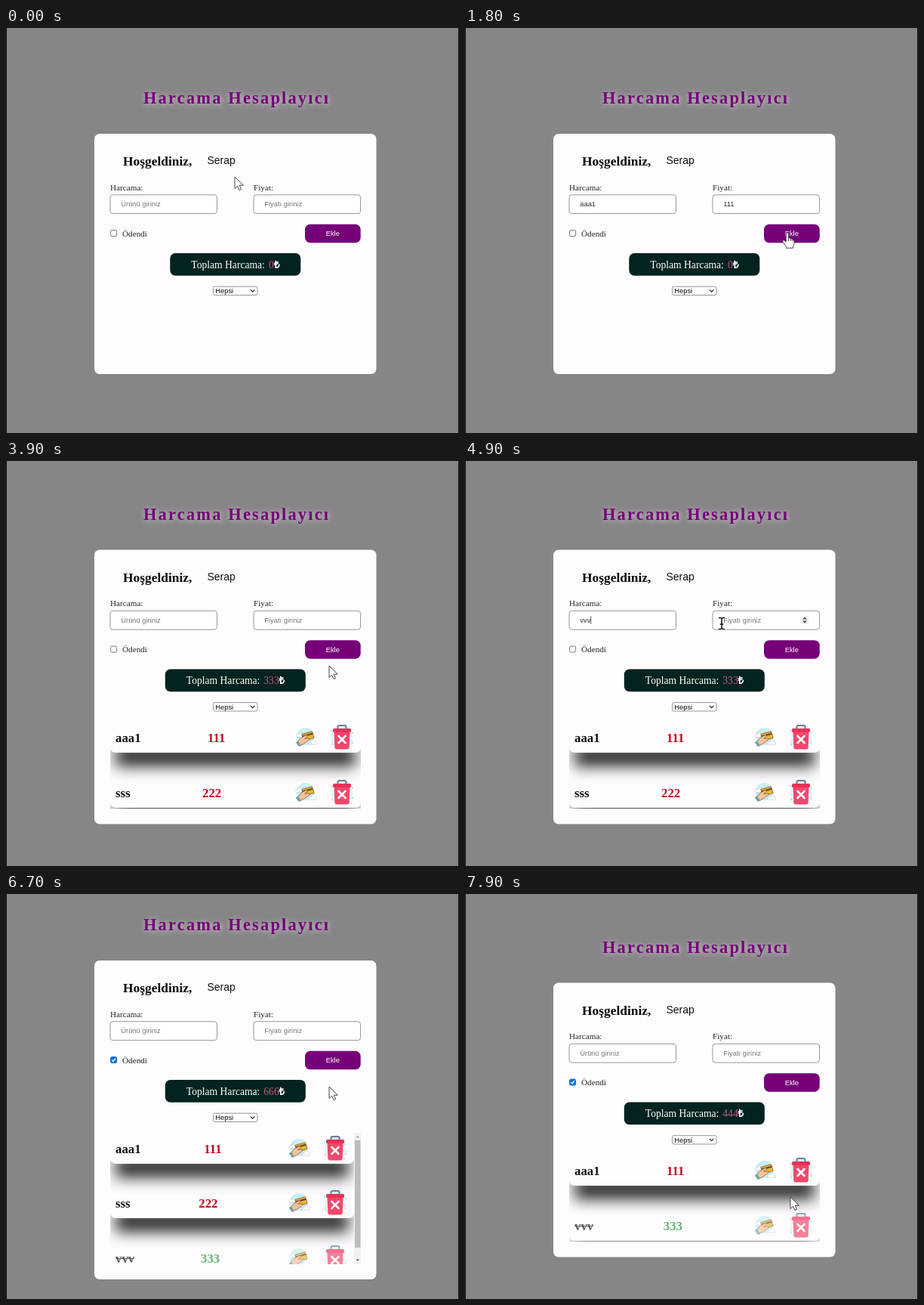
Animation, 600 px wide and 536 px high, one loop 8000 ms. Source, as an HTML page:

```html
<!DOCTYPE html>
<html lang="tr">
<head>
<meta charset="utf-8">
<title>Harcama Hesaplayıcı</title>
<style>
  html, body { margin: 0; width: 600px; height: 536px; overflow: hidden; background: #878588; }
  svg { display: block; }
  #stage, #overlay { position: absolute; left: 0; top: 0; }
  .serif, .item { font-family: "Liberation Serif", "Times New Roman", serif; }
  .sans { font-family: "Liberation Sans", Arial, sans-serif; }
  .label { font-size: 11.2px; fill: #222; }
  .small { font-size: 9.33px; }
  #title { font-size: 22.4px; font-weight: bold; letter-spacing: 2.2px; fill: #760078;
    filter: drop-shadow(1.5px 1.5px 3.5px #d4d0d4); }
  #list { position: absolute; left: 138px; width: 332px; overflow: hidden; }
  .item { position: absolute; left: 0; height: 41px; border-radius: 7px; font: bold 16.8px "Liberation Serif", serif;
    line-height: 41px; color: #111; box-shadow: 0 25px 20px -7px rgba(0, 0, 0, .85); }
  .item span { position: absolute; top: 1px; }
  .item .name { left: 7px; }
  .item .price { color: #c8051c; }
  .item svg { position: absolute; top: 3px; }
  .paid { opacity: .68; }
  .paid .name { text-decoration: line-through; }
  .paid .price { color: #1f9232; }
  #bar { position: absolute; right: 0; top: 0; }
</style>
</head>
<body>
<svg id="stage" width="600" height="536">
  <defs>
    <symbol id="trash" viewBox="0 0 32 36">
      <path d="M4 6Q12-1 21 3Q31 3 29 13Q33 24 27 31Q15 36 5 31Q-1 25 3 17Q0 11 4 6Z" fill="#e4f6f8"/>
      <g fill="#a5dfe6"><circle cx="2" cy="9" r="1"/><circle cx="30" cy="12" r="1"/><circle cx="3" cy="27" r="1"/><circle cx="30" cy="25" r="1"/><circle cx="28" cy="32" r=".8"/></g>
      <path d="M10.5 6V3.7Q10.5 2 12.5 2H19.5Q21.5 2 21.5 3.7V6" fill="none" stroke="#66809a" stroke-width="2"/>
      <path d="M5.5 10H26.5L25.6 31Q25.4 33.5 23 33.5H9Q6.6 33.5 6.4 31Z" fill="#f2476b"/>
      <rect x="4" y="6" width="24" height="5" rx="1.6" fill="#e73258"/>
      <path d="M11.5 16L20.5 25M20.5 16L11.5 25" stroke="#fff" stroke-width="2.6" stroke-linecap="round"/>
    </symbol>
    <symbol id="pay" viewBox="0 0 30 30">
      <circle cx="14" cy="14" r="12" fill="#c9eef3"/>
      <path d="M1 14Q1 10 5 11Q7 7 10 11L12 15H2ZM18 25Q18 21 22 21Q24 17 27 20Q30 21 29 25Z" fill="#fff" stroke="#a9c4cb" stroke-width=".6"/>
      <path d="M9 11L23 7L26 16L12 20Z" fill="#efb52f" stroke="#7a5627" stroke-width=".8"/>
      <path d="M9.6 13L23.6 9L24.3 11.2L10.3 15.2Z" fill="#684426"/>
      <path d="M2 23L8 16L15 12Q18 12 16 14.5L13 17L18 16.5Q21 17 19 19L12 24L6 27Z" fill="#f5c29b" stroke="#855a3e" stroke-width=".8"/>
      <path d="M1 22L4 20L8 26L5 28Z" fill="#62a9a2"/>
    </symbol>
  </defs>
  <rect width="600" height="536" fill="#878588"/>
  <path d="M.5 0V536M599.5 0V536" stroke="#111"/>
  <rect id="card" x="117" width="373.5" rx="7" fill="#fefcff"/>
  <g id="form">
    <text id="title" class="serif" x="182" y="100">Harcama Hesaplayıcı</text>
    <text class="serif" x="155" y="182" font-size="17.4" font-weight="bold" fill="#080808">Hoşgeldiniz,</text>
    <text class="sans" x="266.5" y="180" font-size="14" fill="#111">Serap</text>
    <text class="serif label" x="138" y="214.5">Harcama:</text>
    <text class="serif label" x="328" y="214.5">Fiyat:</text>
    <g fill="#fff" stroke="#98969a">
      <rect x="138" y="220.8" width="141.5" height="24.8" rx="3.5"/>
      <rect x="328" y="220.8" width="141.5" height="24.8" rx="3.5"/>
    </g>
    <text id="what" class="sans small" x="152.3" y="236"></text>
    <text id="cost" class="sans small" x="342.3" y="236"></text>
    <path id="caret" stroke="#222" stroke-width=".8"/>
    <g id="spinner">
      <rect x="445" y="227.5" width="10" height="11" fill="#efeff0"/>
      <path d="M447 232L450 228.8L453 232ZM447 234L450 237.2L453 234Z" fill="#555"/>
    </g>
    <rect id="box" x="138.6" y="267.6" width="8" height="8" rx="1.6"/>
    <path id="tick" d="M140.4 271.8L142 273.5L145 269.6" fill="none" stroke="#fff" stroke-width="1.3"/>
    <text class="serif label" x="154" y="275.5">Ödendi</text>
    <rect x="396" y="259.8" width="73.7" height="24.5" rx="7" fill="#760078"/>
    <text class="sans small" x="432.8" y="275.2" text-anchor="middle" fill="#fff">Ekle</text>
    <rect id="totalBox" y="298" height="29.8" rx="7" fill="#02231f"/>
    <g class="serif" font-size="13.6" fill="#fff">
      <text id="totalLabel" y="317.5">Toplam Harcama:</text>
      <text id="total" y="317.5" fill="#c2588e"></text>
      <text id="lira" y="317.5" font-weight="bold">₺</text>
    </g>
    <rect x="274.5" y="342.2" width="58.5" height="11.3" rx="2" fill="#fff" stroke="#7d7b7e" stroke-width=".8"/>
    <text class="sans small" x="277.3" y="351.2" fill="#111">Hepsi</text>
    <path d="M323.8 346.4L326.6 349.2L329.4 346.4" fill="none" stroke="#222" stroke-width="1.2"/>
  </g>
</svg>
<div id="list">
  <svg id="bar" width="9.5" height="174">
    <rect width="9.5" height="174" fill="#f1f1f1"/>
    <rect x="1" y="10" width="7.5" height="142" fill="#bdbdbd"/>
    <path d="M2.7 6.3L4.8 4L6.9 6.3Z" fill="#999"/>
    <path d="M2.7 167.5L4.8 170L6.9 167.5Z" fill="#555"/>
  </svg>
</div>
<svg id="overlay" width="600" height="536">
  <g id="arrow" fill="#fff" stroke="#333" stroke-width=".9" stroke-linejoin="round">
    <path d="M0 0V15.5L3.6 12.2L6 17.6L8.5 16.5L6.2 11.2H11.2Z"/>
  </g>
  <g id="hand" fill="#fff" stroke="#333" stroke-width=".9" stroke-linejoin="round">
    <path d="M-1.8 1.6Q-1.8 0 0 0Q1.6 0 1.6 1.6V7Q4 6 4.5 8Q6.5 7.2 7 9Q9 8.6 9 11V14.5Q9 16.5 7.5 18V20.2H-1.6V18.3L-5.8 12.5Q-7 10.5-5.4 9.8Q-4 9.4-1.8 12Z"/>
    <path d="M1.6 7V11M4.5 8V11.2M7 9V11.7" fill="none"/>
  </g>
  <g id="beam" fill="none">
    <path d="M-4-7.5H-1.5L0-6.5L1.5-7.5H4M0-6.5V6.5M-4 7.5H-1.5L0 6.5L1.5 7.5H4" stroke="#fff" stroke-width="3"/>
    <path d="M-4-7.5H-1.5L0-6.5L1.5-7.5H4M0-6.5V6.5M-4 7.5H-1.5L0 6.5L1.5 7.5H4M-2.3 1H2.3" stroke="#111" stroke-width="1.5"/>
  </g>
</svg>
<script>
const LOOP = 8000, TICK = 100;
const $ = id => document.getElementById(id);
const show = (el, on) => { el.style.display = on ? '' : 'none'; };
const setX = (id, x) => $(id).setAttribute('x', x);

// Typed text, time of its first key, time the form is cleared
const whatEntries = [['aaa1', 500, 2000], ['sss', 2700, 3900], ['vvv', 4600, 6600]];
const costEntries = [['111', 1100, 2000], ['222', 3100, 3900], ['333', 5000, 6600]];

// Time, x, y
const path = [
  [0, 303, 197], [100, 297, 204], [400, 208, 236], [800, 208, 236], [1000, 352, 238],
  [1500, 352, 238], [1800, 427, 271], [2400, 427, 271], [2600, 212, 236], [2800, 212, 236],
  [3000, 353, 240], [3400, 353, 240], [3700, 428, 271], [4200, 428, 271], [4500, 208, 214],
  [4700, 208, 214], [4900, 340, 215], [5200, 340, 215], [5500, 143, 251], [5700, 143, 251],
  [6300, 428, 255], [6800, 428, 255], [7400, 436, 402], [7600, 436, 402], [7700, 431, 401], [8000, 431, 401]
];

// Name, price, name width, added, removed, paid
const expenses = [
  ['aaa1', 111, 33.6, 2000, LOOP, false],
  ['sss', 222, 19.6, 3900, 7600, false],
  ['vvv', 333, 25.2, 6600, LOOP, true]
].map(([name, price, width, from, to, paid]) => {
  const el = document.createElement('div');
  el.className = 'item' + (paid ? ' paid' : '');
  el.innerHTML = `<span class="name">${name}</span><span class="price">${price}</span>
    <svg class="pay" width="29" height="29" style="top:6px"><use href="#pay"/></svg>
    <svg class="trash" width="32" height="36"><use href="#trash"/></svg>`;
  $('list').insertBefore(el, $('bar'));
  return { el, price, width, from, to };
});

const shifts = [0, 0, -22.5, -52];
const listHeights = [0, 69.5, 114.5, 174];

function pointerAt(t) {
  const i = Math.max(1, path.findIndex(p => p[0] >= t));
  const [t0, x0, y0] = path[i - 1], [t1, x1, y1] = path[i];
  const u = (t - t0) / (t1 - t0), e = u * u * (3 - 2 * u);
  return [x0 + (x1 - x0) * e, y0 + (y1 - y0) * e];
}

function typedAt(entries, t) {
  const entry = entries.find(([, from, to]) => t >= from && t < to);
  return entry ? entry[0].slice(0, Math.floor((t - entry[1]) / TICK) + 1) : '';
}

function drawField(id, text, hint) {
  $(id).textContent = text || hint;
  $(id).setAttribute('fill', text ? '#2b2b2b' : '#777');
}

function drawCaret(t, what, cost) {
  const onWhat = (t >= 400 && t < 1000) || (t >= 2600 && t <= 3000) || (t >= 4500 && t <= 4900);
  const onCost = (t > 1000 && t < 1600) || (t > 3000 && t < 3500) || (t > 4900 && t < 5700);
  show($('caret'), onWhat || onCost);
  const field = $(onWhat ? 'what' : 'cost');
  const filled = onWhat ? what : cost;
  const x = (onWhat ? 152.3 : 342.3) + (filled ? field.getComputedTextLength() + .4 : 0);
  $('caret').setAttribute('d', `M${x} 228V238`);
}

function drawList(t, items, dy) {
  const scrolls = items.length > 2, width = scrolls ? 322.5 : 332;
  $('list').style.top = 367.5 + dy + 'px';
  $('list').style.height = listHeights[items.length] + 'px';
  show($('bar'), scrolls);
  expenses.forEach(item => {
    const row = items.indexOf(item);
    show(item.el, row >= 0);
    if (row < 0) return;
    item.el.style.top = row * 72.5 + 'px';
    item.el.style.width = width + 'px';
    const place = (cls, x) => { item.el.querySelector('.' + cls).style.left = x + 'px'; };
    place('price', 129 + (item.width - 33.6) / 2 - (332 - width) / 2);
    place('pay', width - 87);
    place('trash', width - 41);
  });
}

function drawPointer(x, y, dy, items) {
  const inside = (l, top, r, b) => x >= l && x <= r && y >= top && y <= b;
  const onCost = inside(328, 221 + dy, 470, 246 + dy);
  const onField = onCost || inside(138, 221 + dy, 280, 246 + dy);
  const onTrash = items.some((_, i) => inside(420, 370 + dy + i * 72.5, 456, 408 + dy + i * 72.5));
  const onLink = inside(396, 260 + dy, 470, 284 + dy) || onTrash;
  const kind = onField ? 'beam' : onLink ? 'hand' : 'arrow';
  for (const id of ['arrow', 'hand', 'beam']) {
    show($(id), id === kind);
    $(id).setAttribute('transform', `translate(${x} ${y})`);
  }
  show($('spinner'), onCost);
}

function draw(t) {
  const items = expenses.filter(item => t >= item.from && t < item.to);
  const dy = shifts[items.length];
  $('form').setAttribute('transform', `translate(0 ${dy})`);
  $('card').setAttribute('y', 140 + dy);
  $('card').setAttribute('height', 318 - 2 * dy);

  const what = typedAt(whatEntries, t), cost = typedAt(costEntries, t);
  drawField('what', what, 'Ürünü giriniz');
  drawField('cost', cost, 'Fiyatı giriniz');
  drawCaret(t, what, cost);

  const checked = t >= 5700;
  $('box').setAttribute('fill', checked ? '#0b72d9' : '#fff');
  $('box').setAttribute('stroke', checked ? '#0b72d9' : '#777');
  show($('tick'), checked);

  const any = items.length > 0;
  $('total').textContent = items.reduce((sum, item) => sum + item.price, 0);
  setX('totalBox', any ? 210.8 : 217.3);
  $('totalBox').setAttribute('width', any ? 186 : 173);
  setX('totalLabel', any ? 238.8 : 245.3);
  setX('total', any ? 341.3 : 348);
  setX('lira', any ? 361.3 : 354.8);

  drawList(t, items, dy);
  drawPointer(...pointerAt(t), dy, items);
}

const start = performance.now();
function frame() {
  const t = Math.max(0, performance.now() - start) % LOOP;
  draw(Math.floor(t / TICK) * TICK);
  requestAnimationFrame(frame);
}
frame();
</script>
</body>
</html>
```
